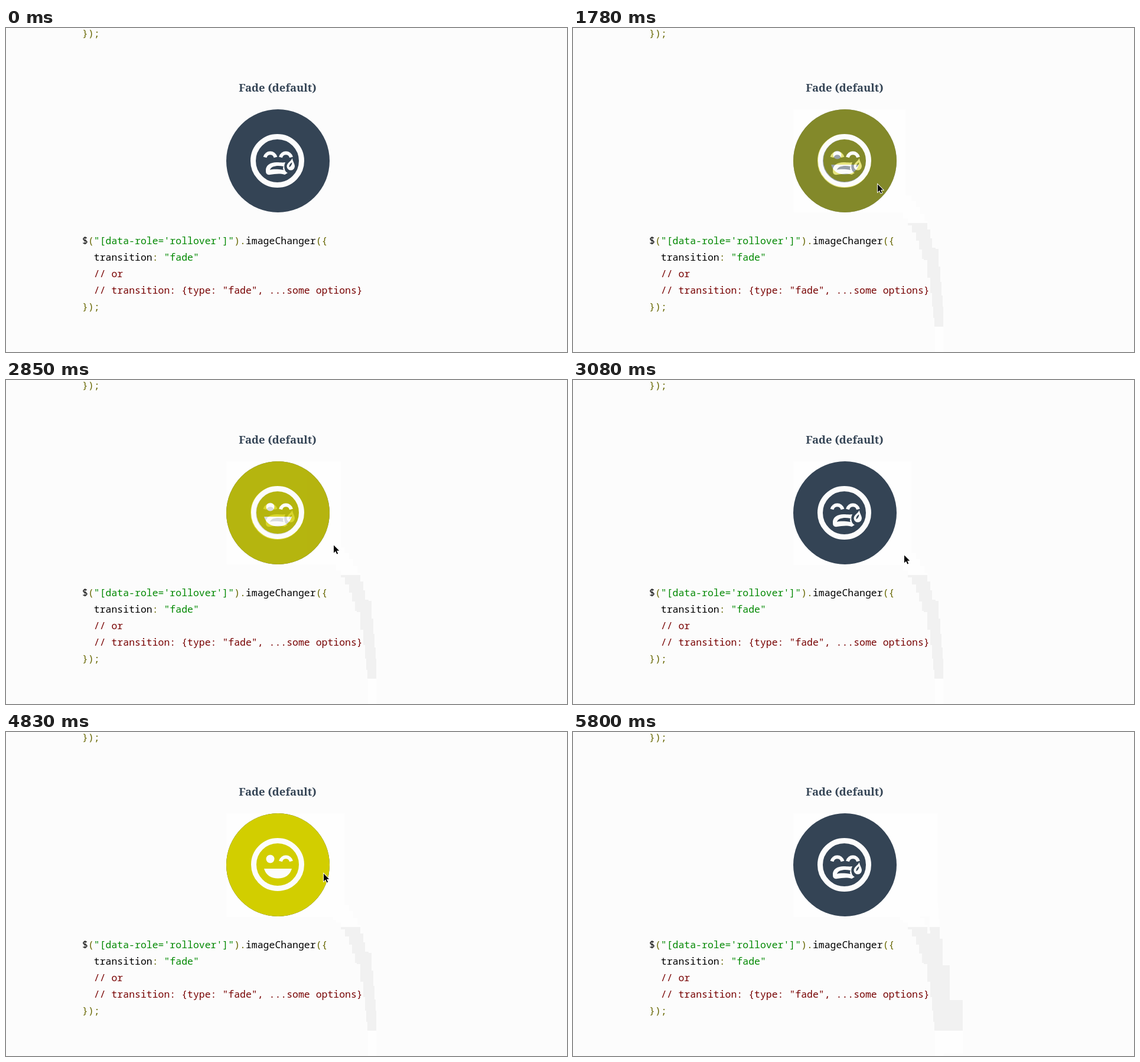
An HTML page that plays this animation: 950x550 px, repeating every 6880 ms.

```html
<!DOCTYPE html>
<html lang="en">
<head>
<meta charset="utf-8">
<title>Fade rollover</title>
<style>
  html, body { margin: 0; width: 100%; height: 100%; overflow: hidden; background: #fcfcfc; }
  svg { display: block; }
  .title { font: bold 18.5px "Noto Serif", serif; fill: #344455; text-anchor: middle; }
  .code { font: 500 16.495px "Noto Sans Mono", monospace; white-space: pre; }
  .pun { fill: #660; }
  .str { fill: #080; }
  .com { fill: #700; }
  .line { fill: none; stroke: #fcfcfc; stroke-width: 6; }
  .ring { fill: none; stroke: #fcfcfc; stroke-width: 9; }
  .white { fill: #fcfcfc; }
</style>
</head>
<body>
<svg width="950" height="550" viewBox="0 0 950 550">
  <defs>
    <clipPath id="band"><rect y="331" width="950" height="176"/></clipPath>
    <path id="arch" d="M438.5 219.5C441 209.8 454 209.8 456.5 219.5"/>
  </defs>

  <path class="trail" fill="#fefefe"/>
  <path class="trail" fill="#f1f1f1" clip-path="url(#band)"/>

  <text class="title" x="460" y="108">Fade (default)</text>
  <g class="code">
    <text class="pun" x="129" y="15">});</text>
    <text x="129" y="367">$<tspan class="pun">(</tspan><tspan class="str">"[data-role='rollover']"</tspan><tspan class="pun">).</tspan>imageChanger<tspan class="pun">({</tspan></text>
    <text x="148.8" y="395">transition<tspan class="pun">:</tspan> <tspan class="str">"fade"</tspan></text>
    <text class="com" x="148.8" y="423">// or</text>
    <text class="com" x="148.8" y="451">// transition: {type: "fade", ...some options}</text>
    <text class="pun" x="129" y="479">});</text>
  </g>

  <g id="sad">
    <circle cx="460.5" cy="225.5" r="87.5" fill="#344455"/>
    <circle class="ring" cx="459.5" cy="225.5" r="41"/>
    <use href="#arch" class="line"/>
    <use href="#arch" class="line" x="26.5"/>
    <path class="white" fill-rule="evenodd" d="M440 243C439 233 448 228 458 228C464 228 468 229 473 228Q470 234 472 240Q473 244 477 246L472 249C463 246 455 248 447 249Q440 250 440 243ZM447 241C453 239 462 240 470 241Q468 238 470 235C460 233 449 234 447 241Z"/>
    <path class="white" stroke="#344455" stroke-width="4" paint-order="stroke" d="M485 221C485 226 489 230 489 235A6.8 7.5 0 0 1 475.5 235C475.5 229 482 227 485 221Z"/>
    <path fill="#344455" d="M484.5 228Q479 231 479.5 236.5Q484 234 484.5 228Z"/>
  </g>

  <g id="happy">
    <circle cx="460.5" cy="225.5" r="87.5" fill="#d2ce00"/>
    <circle class="ring" cx="460" cy="225" r="40.5"/>
    <circle class="white" cx="447.5" cy="215.5" r="7"/>
    <use href="#arch" class="line" x="26.5"/>
    <path class="white" d="M437 232H484C481 243 472 248.5 460.5 248.5S440 243 437 232Z"/>
  </g>

  <path id="cursor" d="M1 1.5V14.5L4 11.6L6.3 16.6L8.2 15.7L6 10.8H10.2Z" stroke="#fff" paint-order="stroke" stroke-width="1.8"/>
</svg>

<script>
const LOOP = 6880, FADE = 250;

const linear = p => p;
const easeIn = p => p * p;
const easeOut = p => p * (2 - p);
const easeBoth = p => p * p * (3 - 2 * p);

// pointer moves: a quadratic curve (start, control, end) sampled in equal steps
const moves = [
  { from: 480, to: 1150, count: 12, ease: easeIn, path: [[614, 532], [616, 465], [601, 376]] },
  { from: 1210, to: 1900, count: 13, ease: linear, path: [[595, 374], [578, 275], [487, 255]] },
  { from: 2560, to: 3250, count: 13, ease: easeOut, path: [[487, 255], [566, 264], [559, 301]] },
  { from: 3430, to: 4120, count: 13, ease: easeOut, path: [[559, 301], [549, 241], [523, 238]] },
  { from: 4710, to: 5350, count: 12, ease: easeBoth, path: [[523, 238], [605, 243], [604, 291]] },
  { from: 5410, to: 5800, count: 8, ease: easeIn, path: [[605, 293], [605, 453], [683, 613]] }
];

// start time and final opacity of the happy face
const fades = [[1655, 1], [2770, 0], [3495, 1], [4925, 0]];

const bezier = (a, b, c, u) => Math.round(a * (1 - u) ** 2 + 2 * b * u * (1 - u) + c * u * u);

const steps = moves.flatMap(({ from, to, count, ease, path: [a, b, c] }) =>
  Array.from({ length: count }, (_, i) => {
    const p = i / (count - 1), u = ease(p);
    return {
      time: Math.floor((from + (to - from) * p) / 10) * 10,
      tip: [0, 1].map(k => bezier(a[k], b[k], c[k], u))
    };
  }));
const last = steps.length - 1;

function opacityAt(t) {
  const fade = fades.findLast(f => f[0] <= t);
  if (!fade) return 0;
  const p = Math.min(1, (t - fade[0]) / FADE);
  const eased = 0.5 - Math.cos(Math.PI * p) / 2;
  return fade[1] ? eased : 1 - eased;
}

const tipBox = ({ tip: [x, y] }) => [x - 1, y - 1, x + 13, y + 18];
const union = (a, b) => a.map((v, i) => (i < 2 ? Math.min : Math.max)(v, b[i]));

// each step repaints the old and new pointer, and the button while it fades
const patches = steps.map((step, i) => {
  let box = tipBox(steps[Math.max(0, i - 1)]);
  if (i < last) box = union(box, tipBox(step));
  if (fades.some(([t]) => step.time > t && step.time <= t + FADE + 60)) {
    box = union(box, [373, 138, 548, 313]);
  }
  const [left, top, right, bottom] = box;
  return `M${left} ${top}H${right}V${bottom}H${left}Z`;
});

const trails = document.querySelectorAll(".trail");
const happy = document.getElementById("happy");
const cursor = document.getElementById("cursor");

function draw(t) {
  const i = steps.findLastIndex(s => s.time <= t);
  const shown = i >= 0 && i < last;
  const d = patches.slice(0, i + 1).join("");
  trails.forEach(p => p.setAttribute("d", d));
  happy.setAttribute("opacity", i < 0 ? 0 : opacityAt(steps[i].time));
  cursor.setAttribute("visibility", shown ? "visible" : "hidden");
  if (shown) cursor.setAttribute("transform", `translate(${steps[i].tip})`);
}

const start = performance.now();
function tick() {
  draw((performance.now() - start) % LOOP);
  requestAnimationFrame(tick);
}
tick();
</script>
</body>
</html>
```
